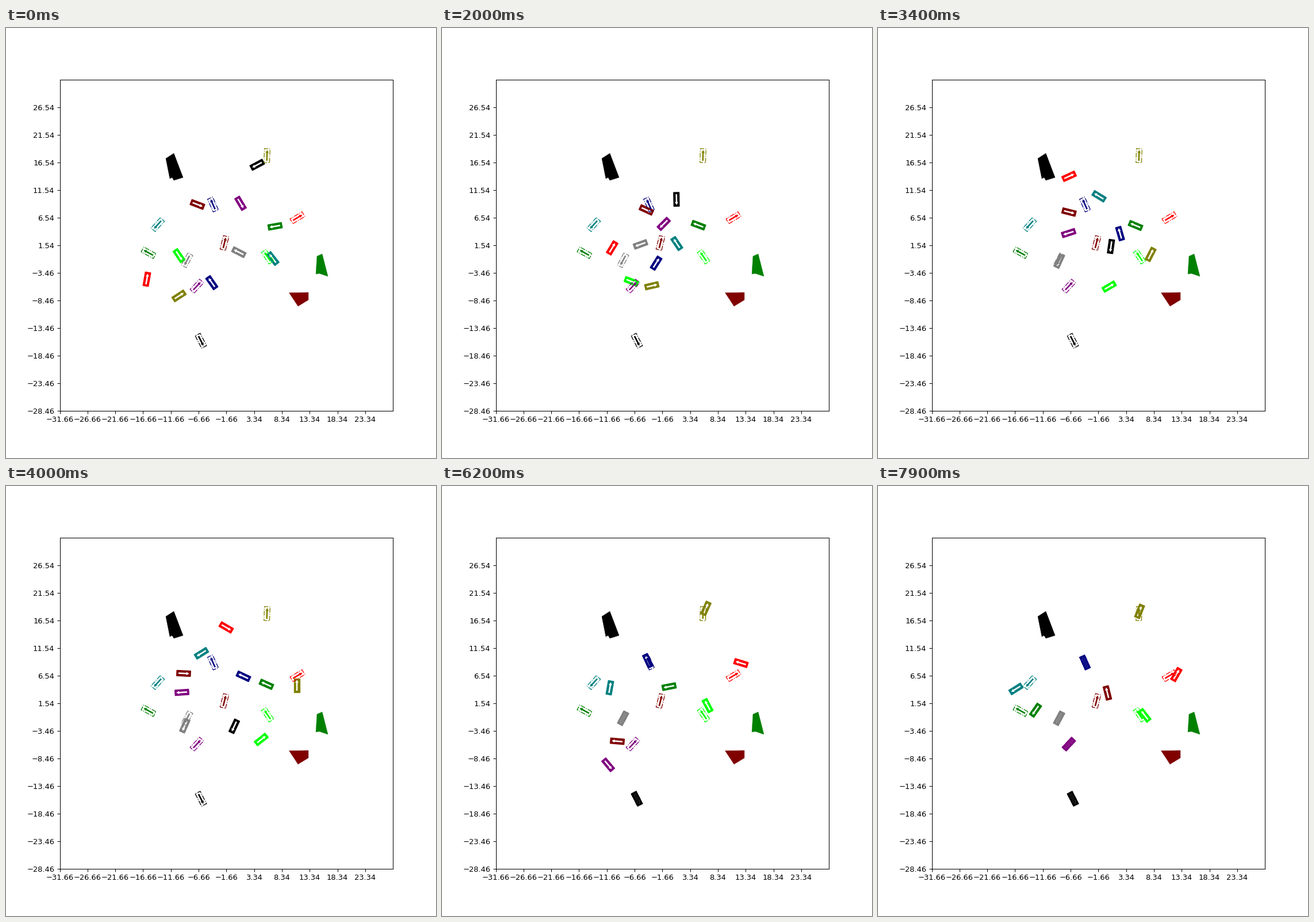
Write a matplotlib script that moves like this. It is 748x748 px and loops after 8 s.

```python
import numpy as np
import matplotlib.pyplot as plt
from matplotlib.animation import FuncAnimation
from matplotlib.patches import Polygon

SIZE, DPI = 748, 93.5
FRAMES, INTERVAL = 80, 100
CLOCK = (0.1, 1.3, 2.7, 4.0, 4.9, 6.2, 7.9)  # seconds at the key poses

L, W = 12.1, 4.85
BODY = np.array([(-L, -W), (L, -W), (L, W), (-L, W)])
ARROW = np.array([(-9, -1.3), (4.8, -1.3), (4.8, -2.9), (9.8, 0),
                  (4.8, 2.9), (4.8, 1.3), (-9, 1.3)])

fig = plt.figure(figsize=(SIZE / DPI, SIZE / DPI), dpi=DPI)
ax = fig.add_subplot()
ax.set(xlim=(-31.66, 28.34), ylim=(-28.46, 31.54),
       xticks=-31.66 + 5 * np.arange(12), yticks=-28.46 + 5 * np.arange(12))

# Pixel-space layer for all shapes
stage = fig.add_axes([0, 0, 1, 1])
stage.set(xlim=(0, SIZE), ylim=(SIZE, 0))
stage.axis("off")


def direction(degrees):
    a = np.radians(degrees)
    return np.array([np.cos(a), -np.sin(a)])


def place(shape, pose):
    """Turn a shape to the pose's heading and move it to its centre."""
    x, y, heading = pose
    return (np.outer(shape[:, 0], direction(heading))
            + np.outer(shape[:, 1], direction(heading + 90)) + (x, y))


def add(points, z, **style):
    return stage.add_patch(Polygon(points, closed=True, zorder=z, **style))


def drive(a, b, u):
    """Roll from pose a to pose b on an arc, in reverse if b lies behind."""
    a, b = np.array(a, float), np.array(b, float)
    chord, turn = b[:2] - a[:2], b[2] - a[2]
    gear = np.sign(chord @ direction(a[2] + turn / 2))
    pull = gear * np.hypot(*chord) / np.cos(np.radians(turn / 4)) ** 2
    x, y = (a[:2] + chord * u * u * (3 - 2 * u)
            + pull * u * (1 - u) * ((1 - u) * direction(a[2])
                                    - u * direction(b[2])))
    return x, y, a[2] + turn * u


class Car:
    def __init__(self, color, z, goal, *poses, park=False):
        self.poses = poses + (goal,) if park else poses
        self.body = add(BODY, z, fc=color, ec=color, lw=1)
        self.arrow = add(ARROW, z + 0.5, fc="white", ec="none")
        add(place(BODY, goal), 50, fill=False, ec=color, lw=1, ls="-.")
        add(place(ARROW, goal), 51, fc=color, ec="none")

    def move(self, leg):
        leg = min(leg, len(self.poses) - 1)
        i = min(int(leg), len(self.poses) - 2)
        pose = drive(self.poses[i], self.poses[i + 1], leg - i)
        self.body.set_xy(place(BODY, pose))
        self.arrow.set_xy(place(ARROW, pose))


# Obstacles
add([(278, 227), (292, 218), (308, 260), (292, 265), (289, 260), (285, 262)],
    1, color="black", lw=0.3)
add([(541, 397), (550, 393), (560, 432), (545, 427), (539, 428)],
    1, color="green", lw=0.3)
add([(492.5, 460.5), (526, 460), (526, 473), (508, 484)],
    1, color="maroon", lw=0.3)

# Each pose is x, y, heading; the first one is the goal.
# Parking cars finish in the goal itself.
cars = [
    Car("black", 2, (339, 544, 297), (437, 238, 208), (423, 262, 260),
        (400, 334, 282), (397, 418, 245), (361, 497, 235), park=True),
    Car("red", 3, (507, 330, 31), (245, 437, 80), (264, 416, 30),
        (308, 337, 88), (383, 246, -30), (468, 312, -27), (520, 308, 163),
        (519, 328, 420)),
    Car("green", 4, (248, 391, 151), (468, 345, 190), (450, 344, 160),
        (442, 342, 159), (453, 345, 156), (450, 344, 168), (395, 349, 191),
        (274, 390, 235)),
    Car("maroon", 5, (380, 374, 76), (333, 307, -21), (353, 315, -22),
        (358, 318, -27), (309, 326, -3), (255, 346, 51), (305, 444, 175),
        (399, 360, 104)),
    Car("olive", 6, (454, 222, 88), (301, 466, 33), (324, 455, -5),
        (403, 429, 31), (506, 347, 90), (470, 259, 163), (459, 213, 66),
        (455, 218, 68)),
    Car("navy", 7, (360, 307, 114), (358, 443, 125), (355, 423, 67),
        (393, 397, 49), (413, 331, 155), (364, 318, 117), (358, 304, 115),
        park=True),
    Car("lime", 8, (455, 398, 124), (301, 396, -56), (317, 411, -63),
        (349, 452, 21), (444, 441, 38), (469, 397, 97), (462, 382, 118),
        (464, 399, 128)),
    Car("purple", 9, (332, 449, 47), (408, 305, -59), (409, 331, -124),
        (359, 347, -146), (306, 359, -176), (269, 386, -105),
        (289, 485, -50), park=True),
    Car("gray", 10, (315, 404, 242), (405, 390, 153), (379, 384, 155),
        (320, 392, 245), (311, 417, 246), park=True),
    Car("teal", 11, (264, 342, 228), (464, 401, 128), (437, 391, 173),
        (402, 344, 75), (340, 291, 212), (253, 306, 208), (292, 351, 440),
        (240, 353, 572)),
]


def update(frame):
    leg = np.interp(frame * INTERVAL / 1000, CLOCK, range(len(CLOCK)))
    for car in cars:
        car.move(leg)


anim = FuncAnimation(fig, update, frames=FRAMES, interval=INTERVAL,
                     init_func=lambda: update(0), repeat=True,
                     repeat_delay=0, blit=False)
plt.show()
```
